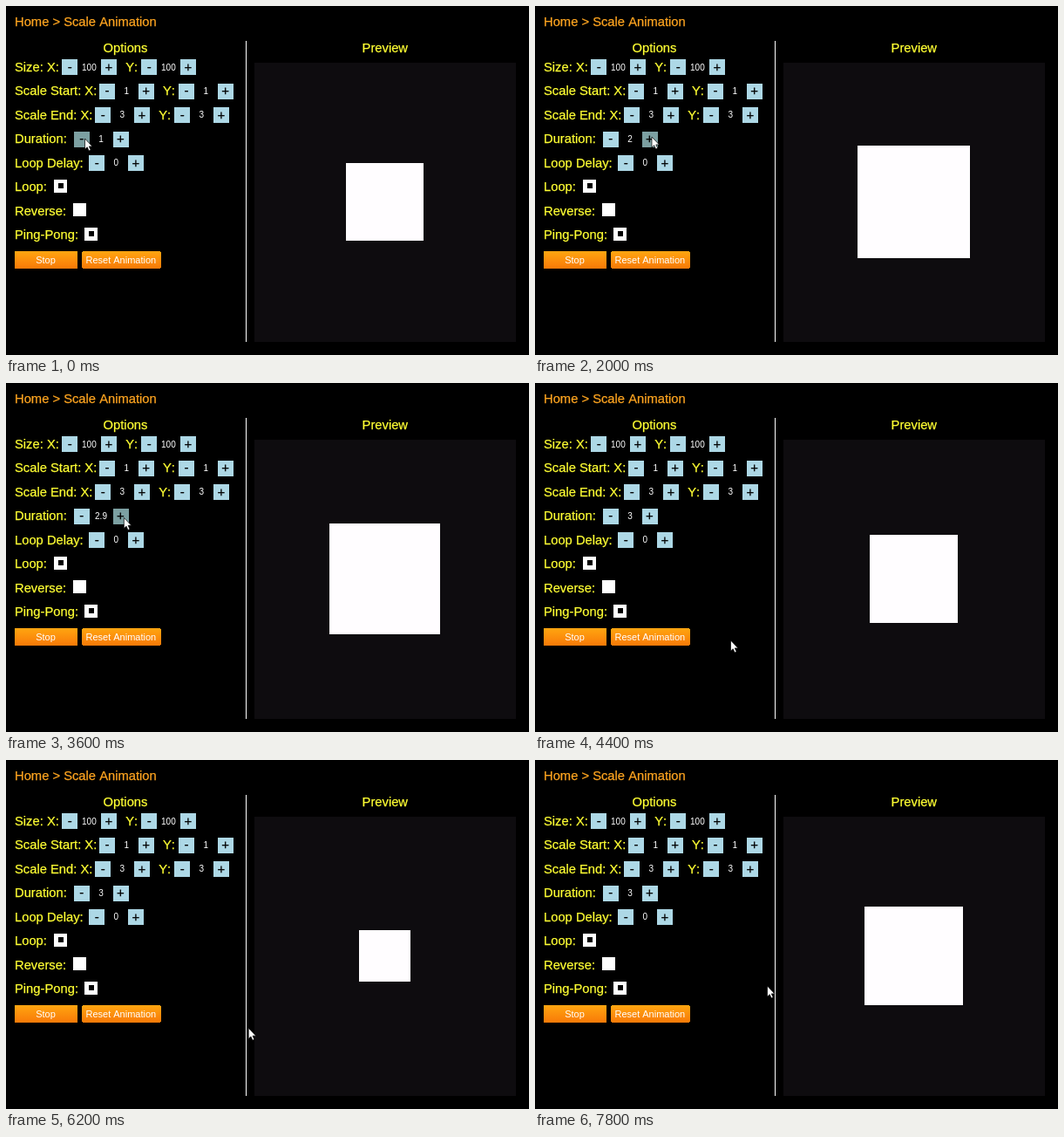
These frames come from a looping animation (600x400 px, 8 s). An HTML page:

```html
<!DOCTYPE html>
<html lang="en">
<head>
<meta charset="utf-8">
<title>Scale Animation</title>
<style>
  html, body { margin: 0; width: 100%; height: 100%; overflow: hidden; background: #000; }
  svg { display: block; width: 600px; height: 400px; }
  rect { shape-rendering: crispEdges; }
  text {
    font: 14.75px "Liberation Sans", Arial, sans-serif; font-kerning: none;
    fill: #ff3; stroke: #ff3; stroke-width: .25px;
  }
  .crumb { fill: #ffa520; stroke: #ffa520; }
  .mid { text-anchor: middle; }
  .value { font-size: 10px; fill: #fff; stroke: none; }
  .sign { font-size: 15px; fill: #000; stroke: #000; }
  .caption { font-size: 11px; fill: #fff; stroke: none; }
  .step { fill: #add8e6; }
  .hover { fill: #7ca0a2; }
</style>
</head>
<body>
<svg id="stage" viewBox="0 0 600 400">
  <defs>
    <linearGradient id="orange" x2="0" y2="1">
      <stop stop-color="#ffa510"/>
      <stop offset="1" stop-color="#f87a08"/>
    </linearGradient>
  </defs>
  <rect width="600" height="400"/>
  <rect x="275" y="40" width="1" height="345" fill="#fff"/>
  <rect x="285" y="65" width="300" height="320" fill="#0e0c0f"/>
</svg>
<script>
const stage = document.getElementById('stage');

function add(tag, attrs, content = '') {
  const node = document.createElementNS(stage.namespaceURI, tag);
  for (const key in attrs) node.setAttribute(key, attrs[key]);
  node.textContent = content;
  return stage.appendChild(node);
}
const text = (content, x, y, cls = '') => add('text', { x, y, class: cls }, content);

function stepButton(sign, x, y) {
  const box = add('rect', { x: Math.round(x), y: Math.round(y), width: 18, height: 18, class: 'step' });
  text(sign, x + 9, y + 13.8, 'sign mid');
  return box;
}

function stepper(value, x, y) {
  return {
    minus: stepButton('-', x, y),
    label: text(value, x + 31.2, y + 12.3, 'value mid'),
    plus: stepButton('+', x + 44.7, y)
  };
}

function stepperPair(value, x, y) {
  stepper(value, x, y);
  text('Y:', x + 73, y + 13.8);
  stepper(value, x + 91, y);
}

function checkbox(checked, x, y) {
  add('rect', { x, y: y + .5, width: 15, height: 15, fill: '#fff' });
  if (checked) add('rect', { x: x + 5, y: y + 5, width: 6, height: 6 });
}

function pushButton(label, x, width) {
  add('rect', { x, y: 281.3, width, height: 19.4, rx: 1, fill: 'url(#orange)' });
  text(label, x + width / 2 - .5, 295, 'caption mid');
}

text('Home > Scale Animation', 10, 23, 'crumb');
text('Options', 137, 53, 'mid');
text('Preview', 434.8, 53, 'mid');

const controls = [
  ['Size: X:', stepperPair, 100, 64.2],
  ['Scale Start: X:', stepperPair, 1, 107],
  ['Scale End: X:', stepperPair, 3, 102.2],
  ['Duration:', stepper, 1, 77.8],
  ['Loop Delay:', stepper, 0, 95.2],
  ['Loop:', checkbox, true, 55],
  ['Reverse:', checkbox, false, 76.5],
  ['Ping-Pong:', checkbox, true, 90.3]
].map(([label, build, value, x], row) => {
  const y = 61.2 + row * 27.45;
  text(label, 10, y + 13.8);
  return build(value, x, y);
});
const duration = controls[3];
pushButton('Stop', 10, 72);
pushButton('Reset Animation', 87.2, 90.3);

const square = add('rect', { fill: '#fffdff' });
const cursor = add('path', {
  d: 'M0 0V12.2L2.7 9.7 4.6 14 6.7 13.1 4.8 8.9H8.5Z',
  fill: '#fff', stroke: '#000', 'stroke-width': .7
});

const LOOP = 8, TICK = .2;

// The plus button is clicked about six times a second, up to 3.
const durationAt = time => Math.round(10 * Math.min(3, Math.max(1, 1 + .6 * (time - .4)))) / 10;

// Scaling reverses at each of these times, beginning with a shrink.
const turns = [-.605, .42, 2.93, 5.93];

function scaleAt(time) {
  const leg = turns.findLastIndex(turn => turn <= time);
  const ratio = Math.min(1, (time - turns[leg]) / durationAt(time));
  return leg % 2 ? 1 + 2 * ratio : 3 - 2 * ratio;
}

const path = [
  { at: 0, x: 90.5, y: 152 },
  { at: .4, x: 134, y: 150 },
  { at: 2, x: 134, y: 150 },
  { at: 3.8, x: 135.5, y: 155 },
  { at: 4.4, x: 224.5, y: 295 },
  { at: 4.8, x: 258.5, y: 314 },
  { at: 5.4, x: 275, y: 308 },
  { at: 7, x: 281.5, y: 306.5 },
  { at: 7.2, x: 266.5, y: 259 }
];

function pointerAt(time) {
  const i = path.findLastIndex(point => point.at <= time);
  const from = path[i], to = path[i + 1] || { ...from, at: LOOP };
  const k = (time - from.at) / (to.at - from.at);
  return [from.x + (to.x - from.x) * k, from.y + (to.y - from.y) * k];
}

function draw(time) {
  const size = 50 * scaleAt(time);
  square.setAttribute('x', 434.6 - size / 2);
  square.setAttribute('y', 224.6 - size / 2);
  square.setAttribute('width', size);
  square.setAttribute('height', size);

  const [x, y] = pointerAt(time);
  cursor.setAttribute('transform', `translate(${x} ${y})`);
  duration.label.textContent = durationAt(time);
  duration.minus.classList.toggle('hover', x < 96);
  duration.plus.classList.toggle('hover', x > 122 && x < 141);
}

const start = performance.now();
function frame() {
  const elapsed = (performance.now() - start) / 1000 % LOOP;
  draw(Math.floor(elapsed / TICK + 1e-6) * TICK);
  requestAnimationFrame(frame);
}
frame();
</script>
</body>
</html>
```
